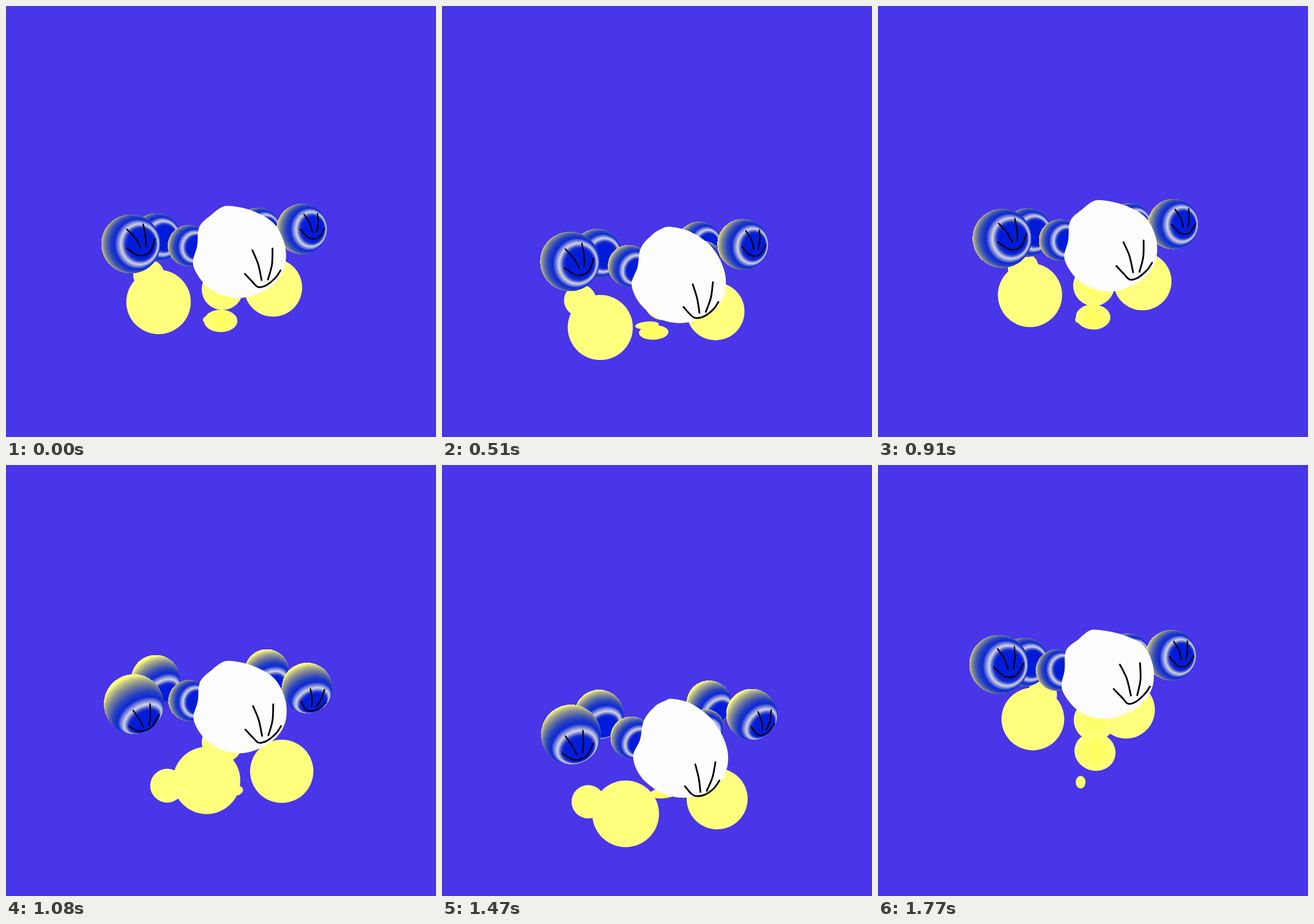
Write an HTML page with a canvas that moves like this. It is 747 px wide and 750 px high and loops after 1800 ms.

```html
<!DOCTYPE html>
<html lang="en">
<head>
<meta charset="utf-8">
<title>Bouncing figure</title>
<style>
  html, body { margin: 0; width: 100%; height: 100%; overflow: hidden; background: #4836e8; }
  canvas { display: block; width: 747px; height: 750px; }
</style>
</head>
<body>
<canvas id="stage" width="747" height="750"></canvas>
<script>
const ctx = document.getElementById('stage').getContext('2d');
const LOOP = 1800, CYCLE = 460;
const PHASES = [0, 50, 90, 160, 280, 390];

// One row per phase. Balls: x, y, r.
const parts = {
  body: [[0, 0, 0], [8, 56, 1], [8, 59, 1], [1, -7, .04], [-4, -93, -.3], [-6, -61, -.45]], // x, y, tilt
  legL: [[265, 515, 56], [286, 586, 57], [319, 607, 58], [348.5, 549, 58.5], [285, 403, 55.5], [269, 442, 54.5]],
  legR: [[464, 490, 50.5], [480, 557, 50.5], [478, 581, 53], [479, 533, 55], [430, 392, 50.5], [431, 426, 50]],
  footL: [[248, 468, 27], [239, 542, 28.5], [254, 586, 29], [280, 558, 29.5], [305, 390, 25], [285, 400, 26]],
  torso: [[376, 493, 36], [392, 520, 36], [392, 525, 36], [376, 482, 36], [381, 415, 41], [376, 444, 36]],
  // Ellipses: x, y, rx, ry, angle.
  shin: [[373, 548, 29, 19.5, 0], [367, 577, 24, 9, -.05], [385, 571, 24, 9, -.1], [398, 567, 14, 9, -.2],
         [377, 455, 47, 15, -.09], [377, 499, 36, 33, .3]],
  footR: [[347, 546, 5, 5, 0], [365, 563, 30, 8, -.15], [385, 570, 24, 8, -.1], [392, 566, 10, 7, 0],
          [360, 563, 20, 17.5, .1], [352, 552, 8.5, 11, 0]],
  // Hands: x, y, r, facing x, facing y, roll.
  handL: [[217, 414, 51.5, .4, .01, -16], [225, 461, 52, .35, .2, -16], [224, 469, 52, .28, .58, -15],
          [222, 416, 52, .41, .68, -15], [206, 279, 51.5, .1, -.08, 13], [210, 347, 51.5, .4, .06, -6]],
  handR: [[514, 388, 44, .5, .02, -2], [529, 429, 44.5, .53, .18, 0], [538, 434, 44.5, .52, .52, 3],
          [523, 388, 44, .3, .68, 12], [498, 273, 44, .7, -.1, -10], [509, 331, 44, .5, .08, 0]],
  armL: [[261, 403, 42.5], [274, 443, 43], [273, 434, 43], [260, 373, 42.5], [266, 298, 43], [254, 343, 42.5]],
  armR: [[438, 389, 38], [453, 424, 38.5], [464, 414, 39], [453, 359, 38.5], [427, 291, 38], [434, 331, 38]],
  shoulderL: [[317, 417, 36], [329, 471, 36.5], [329, 474, 36.5], [318, 410, 36], [311, 324, 36], [310, 357, 36]],
  shoulderR: [[446, 404, 30], [459, 458, 31], [459, 456, 31], [446, 397, 30], [440, 310, 30], [440, 346, 30]]
};

// Upright and tilted outlines of the white head, with its face.
const upright = {
  skin: [[375, 350], [390, 348], [421, 354], [452, 368], [470, 384], [482, 408], [486.5, 432], [483, 457], [469, 480],
         [443, 498], [408, 508], [372, 502], [344, 483], [325, 450], [332, 418], [336, 384], [357, 363]],
  lines: [[[428, 425], [438, 449], [444, 477]], [[463, 422], [462, 450], [455, 476]],
          [[415, 466], [429, 481], [438, 489], [452, 486], [468, 473], [477, 460]]]
};
const tilted = {
  skin: [[380, 351], [392, 348], [422, 355], [452, 375], [470, 396], [483, 421], [489, 446], [486, 472], [474, 494],
         [442, 514], [409, 520], [372, 511], [338, 484], [324, 449], [336, 419], [343, 385], [362, 361]],
  lines: [[[432, 462], [438, 486], [441, 510]], [[467, 458], [462, 484], [452, 508]],
          [[414, 500], [425, 513], [433, 517], [448, 515], [464, 504], [474, 490]]]
};
// Face lines on a unit sphere looking at the viewer.
const handFace = [
  [[-.31, -.61], [-.18, -.25], [-.1, .1]],
  [[.31, -.61], [.2, -.25], [.1, .1]],
  [[-.55, -.02], [-.25, .31], [0, .38], [.25, .31], [.55, -.02]]
];

// Ring colours by angle from the facing direction.
const ramp = [[0, 0, 28, 218], [29, 0, 28, 218], [34, 30, 50, 205], [43, 212, 212, 220], [57, 12, 40, 214],
              [68, 40, 66, 190], [90, 142, 146, 142], [118, 255, 255, 128], [181, 255, 255, 128]];
const shades = Array.from({ length: 361 }, (_, i) => {
  const a = i / 2, n = ramp.findIndex(s => s[0] > a);
  const p = ramp[n - 1], q = ramp[n], k = (a - p[0]) / (q[0] - p[0]);
  return [1, 2, 3].map(c => p[c] + (q[c] - p[c]) * k);
});

// Smooth closed curve through the rows of a part.
function pose(rows, phase) {
  const n = PHASES.length;
  const at = i => PHASES[(i + n) % n] + CYCLE * Math.floor(i / n);
  const row = i => rows[(i + n) % n];
  let i = n - 1;
  while (PHASES[i] > phase) i--;
  const h = at(i + 1) - at(i), s = (phase - at(i)) / h;
  const slope = (j, c) => (row(j + 1)[c] - row(j - 1)[c]) / (at(j + 1) - at(j - 1));
  return row(i).map((v, c) =>
    v * (1 + 2 * s) * (1 - s) ** 2 + row(i + 1)[c] * s * s * (3 - 2 * s) +
    h * (slope(i, c) * s * (1 - s) ** 2 - slope(i + 1, c) * s * s * (1 - s)));
}

const buffer = document.createElement('canvas');
buffer.width = buffer.height = 120;
const bctx = buffer.getContext('2d');

function ringBall([x, y, r], fx, fy) {
  const left = Math.floor(x - r) - 1, top = Math.floor(y - r) - 1, size = Math.ceil(2 * r) + 3;
  const img = bctx.createImageData(size, size);
  const fz = Math.sqrt(Math.max(0, 1 - fx * fx - fy * fy));
  for (let j = 0; j < size; j++) for (let i = 0; i < size; i++) {
    const u = (left + i + .5 - x) / r, v = (top + j + .5 - y) / r, d = 1 - u * u - v * v;
    if (d < 0) continue;
    const dot = Math.max(-1, Math.min(1, u * fx + v * fy + Math.sqrt(d) * fz));
    img.data.set([...shades[Math.round(Math.acos(dot) * 360 / Math.PI)], 255], (j * size + i) * 4);
  }
  bctx.clearRect(0, 0, 120, 120);
  bctx.putImageData(img, 0, 0);
  ctx.drawImage(buffer, left, top);
}

function oval([x, y, rx, ry = rx, angle = 0], core = '#ffff7e') {
  const g = ctx.createRadialGradient(x, y, 0, x, y, Math.max(rx, ry, 1));
  g.addColorStop(.3, core);
  g.addColorStop(1, '#ffff7e');
  ctx.fillStyle = g;
  ctx.beginPath();
  ctx.ellipse(x, y, Math.max(rx, 0), Math.max(ry, 0), angle, 0, Math.PI * 2);
  ctx.fill();
}

function trace(pts, closed) {
  const n = pts.length;
  const get = i => closed ? pts[(i + n) % n] : pts[Math.max(0, Math.min(n - 1, i))];
  ctx.beginPath();
  ctx.moveTo(...pts[0]);
  for (let i = 0; i < (closed ? n : n - 1); i++) {
    const [a, b, c, d] = [-1, 0, 1, 2].map(k => get(i + k));
    ctx.bezierCurveTo(b[0] + (c[0] - a[0]) / 6, b[1] + (c[1] - a[1]) / 6,
                      c[0] - (d[0] - b[0]) / 6, c[1] - (d[1] - b[1]) / 6, c[0], c[1]);
  }
}

function ink(pts, width) {
  trace(pts, false);
  ctx.lineWidth = width;
  ctx.stroke();
}

function head([x, y, tilt]) {
  const mix = (a, b) => a.map((p, i) => [
    p[0] + (b[i][0] - p[0]) * tilt + x,
    p[1] + (b[i][1] - p[1]) * tilt + y
  ]);
  trace(mix(upright.skin, tilted.skin), true);
  ctx.fillStyle = '#fdfdfd';
  ctx.fill();
  upright.lines.forEach((l, i) => ink(mix(l, tilted.lines[i]), 3));
}

function hand([x, y, r, fx, fy, roll]) {
  ringBall([x, y, r], fx, fy);
  const a = roll * Math.PI / 180, cos = Math.cos(a), sin = Math.sin(a);
  const k = 1 / (1 + Math.sqrt(Math.max(0, 1 - fx * fx - fy * fy)));
  for (const line of handFace) ink(line.map(([p, q]) => {
    const u = p * cos - q * sin, v = p * sin + q * cos, w = Math.sqrt(1 - u * u - v * v);
    const along = w - (u * fx + v * fy) * k;
    return [x + r * (u + fx * along), y + r * (v + fy * along)];
  }), 2.4);
}

// The picture is held for about 30 ms at a time.
function held(t) {
  const start = [1020, 790, 530, 40, 0].find(s => t >= s);
  return start ? start + 30 * Math.floor((t - start) / 30) : 0;
}

function draw(time) {
  const t = held(time % LOOP), p = {};
  for (const name in parts) p[name] = pose(parts[name], t % CYCLE);

  // The first bounce throws the hands a little higher.
  const lift = Math.exp(-(((t - 280) / 90) ** 2));
  const shift = (row, by) => row.map((v, i) => v + by[i] * lift);
  p.handL = shift(p.handL, [-2, -5, 0, -.03, -.05, 1]);
  p.handR = shift(p.handR, [-2.5, -3.5, 0, .03, -.04, -4]);

  const faceL = p.handL.slice(3, 5), faceR = p.handR.slice(3, 5);
  ctx.fillStyle = '#4836e8';
  ctx.fillRect(0, 0, 747, 750);
  ctx.strokeStyle = '#000';
  ctx.lineCap = ctx.lineJoin = 'round';

  oval(p.legR);
  oval(p.torso, '#ffff68');
  oval(p.footR, '#ffff64');
  oval(p.shin, '#ffff60');
  oval(p.footL);
  oval(p.legL);
  ringBall(p.armL, ...faceL);
  ringBall(p.armR, ...faceR);
  ringBall(p.shoulderL, .44, .08 + .25 * p.body[2]);
  ringBall(p.shoulderR, .1, .35);
  hand(p.handR);
  head(p.body);
  hand(p.handL);
}

const began = performance.now();
function tick() {
  draw(performance.now() - began);
  requestAnimationFrame(tick);
}
tick();
</script>
</body>
</html>
```
